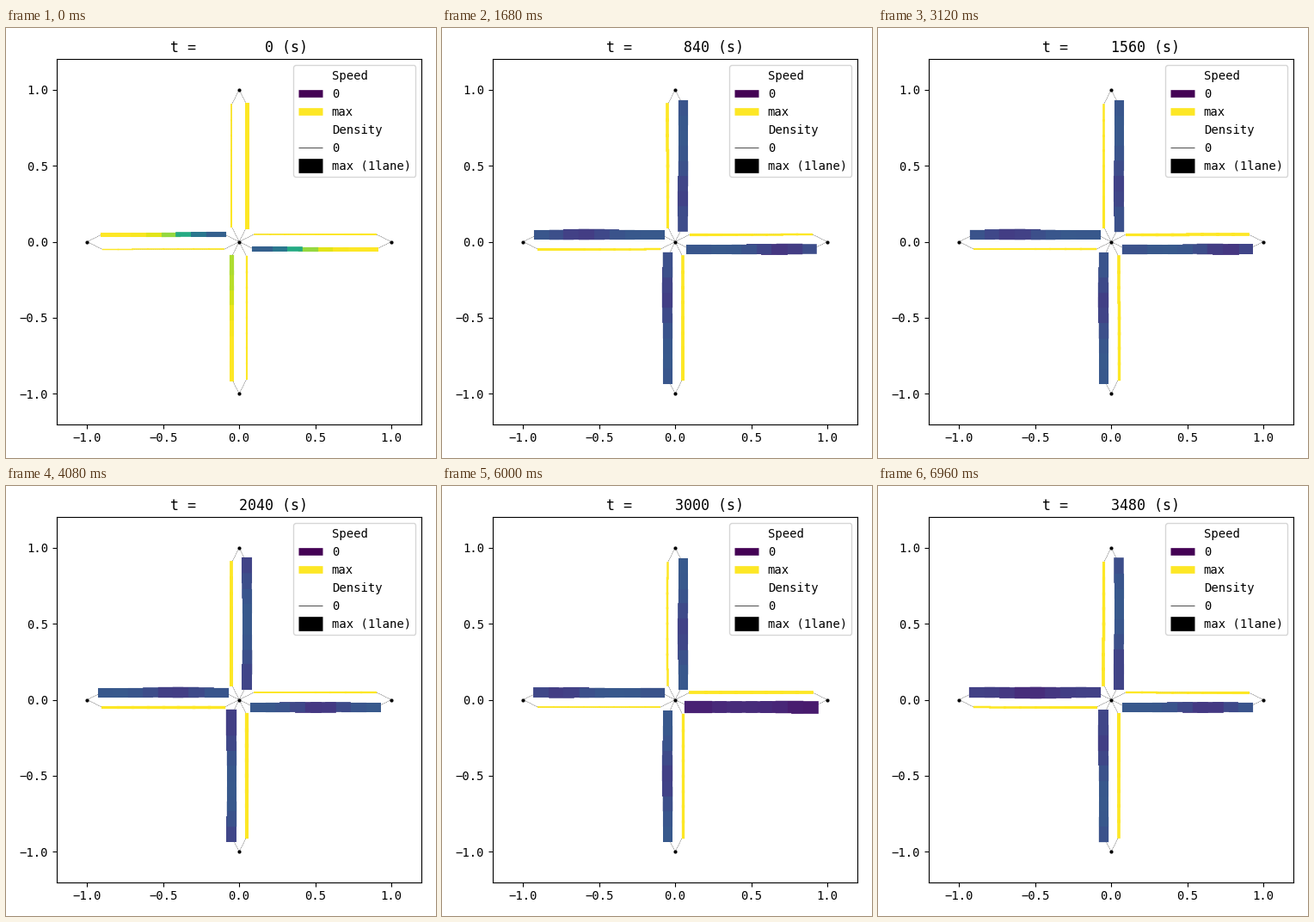
These frames come from a looping animation (500 px wide and 500 px high, 7.2 s). A matplotlib script:

```python
from itertools import product

import matplotlib.pyplot as plt
import numpy as np
from matplotlib.animation import FuncAnimation
from matplotlib.lines import Line2D

plt.rcParams["font.family"] = "DejaVu Sans Mono"

SIZE, DPI = 500, 100
STEPS, STEP_MS, STEP_S = 30, 240, 120
LEFT, BOTTOM, SIDE = 59, 39.3, 424.3    # axes box in pixels
MIN_W, MAX_W = 0.5, 12
VIRIDIS = plt.colormaps["viridis"]

CELLS = 8
CELL = np.arange(CELLS)
QUEUE_SPEED = 0.275     # usual speed in a queue, as a share of the limit
WAVE = 1.42             # cells a slow band moves upstream per step
FRONT, FRONT_PACE = 4.9, 4      # where the first queue ends, how fast it grows
SIGNAL_PERIOD = 14      # steps between peaks of the outgoing flow


class Arm:
    def __init__(self, end, first_speed, band, depth, flow, swing, jam=None):
        self.end = end                  # outer node
        self.first_speed = first_speed  # speed at the junction at the start
        self.band = band                # cell of the slow band at step 0
        self.depth = depth              # speed lost inside the band
        self.flow = flow                # mean outgoing density
        self.swing = swing              # how far the signal varies it
        self.jam = jam                  # step and strength of a heavy jam

    def queue_speed(self, step):
        """Speed in the queue, with a slow band rolling upstream."""
        gap = (CELL - self.band + WAVE * step + CELLS / 2) % CELLS - CELLS / 2
        speed = QUEUE_SPEED - self.depth * np.exp(-(gap / 1.7) ** 2)
        if self.jam:
            peak, strength = self.jam
            speed = speed * (1 - strength * np.exp(-((step - peak) / 1.5) ** 2))
        return speed

    def inbound(self, step):
        filled = min(1, step / 2)
        low = self.first_speed * (1 - filled) + self.queue_speed(step) * filled
        free = 1 / (1 + np.exp((CELL - FRONT + FRONT_PACE * step) / 0.7))
        speed = low + (1 - low) * free
        early = 0.27 + 0.1 * (1 - speed)
        density = early * (1 - filled) + filled / (1 + 2 * speed)
        return speed, density

    def outbound(self, step):
        filled = min(1, step / 2)
        phase = 2 * np.pi * (step - 3) / SIGNAL_PERIOD - 0.12 * CELL
        density = self.flow + self.swing * np.cos(phase)
        return np.ones(CELLS), density * (0.5 + 0.5 * filled)


ARMS = [
    Arm((-1, 0), 0.27, 4.7, 0.10, 0.12, 0.05, jam=(29, 0.3)),
    Arm((1, 0), 0.27, 3.7, 0.12, 0.14, -0.06, jam=(25, 0.55)),
    Arm((0, 1), 1.00, 7.7, 0.08, 0.16, 0.05),
    Arm((0, -1), 0.87, 7.2, 0.09, 0.19, 0.03),
]


def add_link(start, end):
    """Draw the dashed guide and return one line per cell."""
    (x1, y1), (x2, y2) = start, end
    part = np.arange(1, CELLS + 2) / (CELLS + 2)
    x = x1 + (x2 - x1) * part + (y1 - y2) * 0.05
    y = y1 + (y2 - y1) * part + (x2 - x1) * 0.05
    ax.plot([x1, *x, x2], [y1, *y, y2], "k--", lw=0.25, zorder=5)
    return [ax.plot(x[i:i + 2], y[i:i + 2], zorder=6)[0] for i in CELL]


def add_legend():
    mid = (MIN_W + MAX_W) / 2
    rows = [("Speed", "none", 0), ("0", VIRIDIS(0.0), mid), ("max", VIRIDIS(1.0), mid),
            ("Density", "none", 0), ("0", "k", MIN_W), ("max (1lane)", "k", MAX_W)]
    handles = [Line2D([], [], color=color, lw=width, label=label, solid_capstyle="butt")
               for label, color, width in rows]
    ax.legend(handles=handles, loc="upper right")


fig = plt.figure(figsize=(SIZE / DPI, SIZE / DPI), dpi=DPI)
ax = fig.add_axes([LEFT / SIZE, BOTTOM / SIZE, SIDE / SIZE, SIDE / SIZE])
ticks = np.linspace(-1, 1, 5)
ax.set(xlim=(-1.2, 1.2), ylim=(-1.2, 1.2), xticks=ticks, yticks=ticks)
title = ax.set_title("")

CENTER = (0, 0)
for node in [CENTER] + [arm.end for arm in ARMS]:
    ax.plot(*node, "ko", ms=2)

links = []
for arm, inward in product(ARMS, (True, False)):
    if inward:
        links.append((arm.inbound, add_link(arm.end, CENTER)))
    else:
        links.append((arm.outbound, add_link(CENTER, arm.end)))
add_legend()


def update(step):
    title.set_text(f"t = {step * STEP_S:>8} (s)")
    for state, lines in links:
        for line, speed, density in zip(lines, *state(step)):
            line.set_color(VIRIDIS(float(speed)))
            line.set_linewidth(MIN_W + density * (MAX_W - MIN_W))
    return []


anim = FuncAnimation(fig, update, frames=STEPS, interval=STEP_MS,
                     init_func=lambda: update(0), repeat=True)
plt.show()
```
